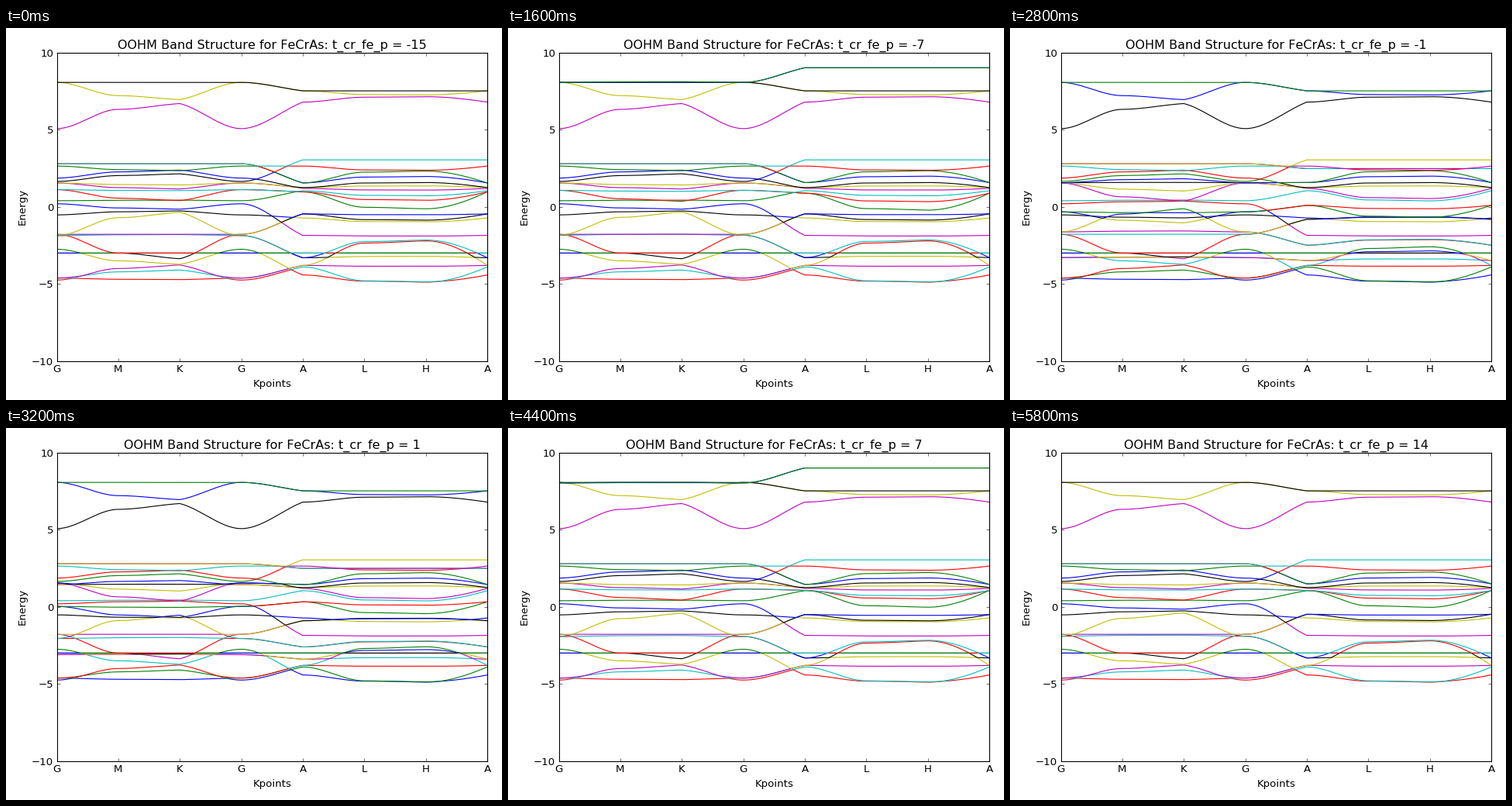
Animation of 640 by 480 pixels, one loop 6 s. Source, as a matplotlib script:

```python
import numpy as np
import matplotlib.pyplot as plt
from matplotlib.animation import FuncAnimation

plt.rcParams.update({
    "font.family": "DejaVu Sans", "font.size": 12, "text.kerning_factor": 6,
    "axes.linewidth": 1.0, "axes.axisbelow": False, "axes.labelpad": 5,
    "lines.solid_capstyle": "projecting",
    "xtick.top": True, "ytick.right": True,
})
for axis in ("xtick", "ytick"):
    plt.rcParams.update({f"{axis}.direction": "in", f"{axis}.major.size": 4,
                         f"{axis}.major.width": 0.5, f"{axis}.major.pad": 4})

COLORS = [(0, 0, 1), (0, 0.5, 0), (1, 0, 0), (0, 0.75, 0.75),
          (0.75, 0, 0.75), (0.75, 0.75, 0), (0, 0, 0)]
T_FIRST = -15
U = np.linspace(0, 1, 60)


def ease(p, q, m0=0, m1=0):
    """Cubic from p to q with end slopes relative to the mean slope."""
    h = U**2 * (3 - 2 * U) + m0 * U * (1 - U)**2 - m1 * U**2 * (1 - U)
    return p + (q - p) * h


# Shapes along G-M-K-G-A-L-H-A: in-plane dispersion, rise to A, top-plane dispersion
flat = ease(0, 0)
x = np.concatenate([n + U for n in range(7)])
plane = np.concatenate([ease(0, 1), ease(1, 1.3, 0, 0.6), ease(1.3, 0, 0.6, 0)] + [flat] * 4)
lift = np.concatenate([flat] * 3 + [ease(0, 1, 0, 0.9)] + [flat + 1] * 3)
top = np.concatenate([flat] * 4 + [ease(0, 1), ease(1, 1.1, 0, 0.6), ease(1.1, 0, 0, 1.7)])


def coupling_fit(*roots):
    """Characteristic polynomial, quadratic in t, from levels at t = -3, 1, 4."""
    return np.polyfit([-3, 1, 4], np.array([np.poly(r) for r in roots]), 2)


FIT_G = coupling_fit((-5.7, -1.78, 0.85, 2.96),
                     (-3.1, -2.05, 0.03, 1.45),
                     (-6.95, -1.95, 1.14, 4.09))
FIT_A = coupling_fit((-5.17, -3.24, -0.48, 0.6, 1.6, 4.07),
                     (-3.4, -2.6, -0.9, 0.33, 1.45, 2.5),
                     (-6.4, -3.32, -0.54, 1.02, 1.42, 5.2))


def levels(fit, t):
    return np.sort(np.roots(fit[0] * t * t + fit[1] * t + fit[2]).real)


def band(g, dg, a, da):
    """Level g at G and a at A, with widths dg and da in the two planes."""
    return g + (a - g) * lift + dg * plane + da * top


def pair(at_g, at_a):
    """Two bands that meet at G and at A: (level, width, width) at each."""
    (g, *dg), (a, *da) = at_g, at_a
    return [band(g, p, a, q) for p, q in zip(dg, da)]


def bands(t):
    lo, r1, r2, up = levels(FIT_G, t)
    la, a1, a2, a3, a4, ua = levels(FIT_A, t)
    w = min(1, 3 / (t * t + 2))**2  # weight of the weak-coupling mixing

    rows = [band(-3, 0, -3, 0)] * 3 + [
        band(-4.75, 0.75, -3.9, -0.9),
        band(-2.75, -0.75, -4.42, -0.4),
        band(-0.52, 0.2 - 0.35 * w, -0.72, -0.23),
        band(0.2, -0.27 + 0.4 * w, -1.85, -0.04),
        band(0.4, 0.03, 1.05, -0.3 - 0.3 * w),
        band(1.65, 0.38, 3.05, 0),
        band(1.87, 0.4, 1.2, -0.1 - 0.5 * w),
        band(2.65, -0.23, 2.65, -0.25),
        band(5.08, 1.25, 6.8, 0.32),
    ]
    rows += pair((8.08, -0.86, 0), (7.53, -0.24, 0))
    rows += pair((-4.62, 0.4, -0.08), (-3.8, -0.05, 1.45 - 0.35 * w))
    rows += pair((-1.78, -1.22, 0), (a2, -0.37 + 0.5 * w, -0.05 + 0.2 * w))
    rows += pair((r1, 1.16, 0.05), (a1, 0.08 + 0.25 * w, 1.05 - 0.7 * w))
    rows += pair((r2, -0.55, -0.05), (a3, -1 + 0.3 * w, -0.5 + 0.3 * w))
    rows += pair((lo, 0.02, 0.04), (la, 0.1 * w, 0.57 * w))

    # These three pairs repel, so they keep their order from G to A
    at_g = sorted([(1.55, -0.3 - 0.6 * w, -0.1 - 0.3 * w), (2.8, 0, 0),
                   (up, 0.02, 0.04 + 0.16 * w)])
    at_a = sorted([(1.25, 0.1, 0.3), (a4, 0.38, 0.7), (ua, 0, 0)])
    for g, a in zip(at_g, at_a):
        rows += pair(g, a)
    return np.sort(rows, axis=0)


fig = plt.figure(figsize=(8, 6), dpi=80, facecolor="white")
ax = fig.add_axes([65.6 / 640, 50.4 / 480, 555.4 / 640, 397.6 / 480])
ax.set_xlim(0, 7)
ax.set_ylim(-10, 10)
ax.set_xticks(range(8), list("GMKGALHA"))
ax.set_yticks(range(-10, 11, 5))
ax.set_xlabel("Kpoints")
ax.set_ylabel("Energy")
title = ax.set_title("", fontsize=14.4, pad=5)
lines = [ax.plot(x, 0 * x, color=COLORS[n % 7], lw=1)[0] for n in range(30)]


def update(i):
    t = T_FIRST + i
    title.set_text(f"OOHM Band Structure for FeCrAs: t_cr_fe_p = {t}")
    for line, e in zip(lines, bands(t)):
        line.set_ydata(e)
    return lines


anim = FuncAnimation(fig, update, frames=30, interval=200,
                     repeat=True, repeat_delay=0, blit=False)
plt.show()
```
